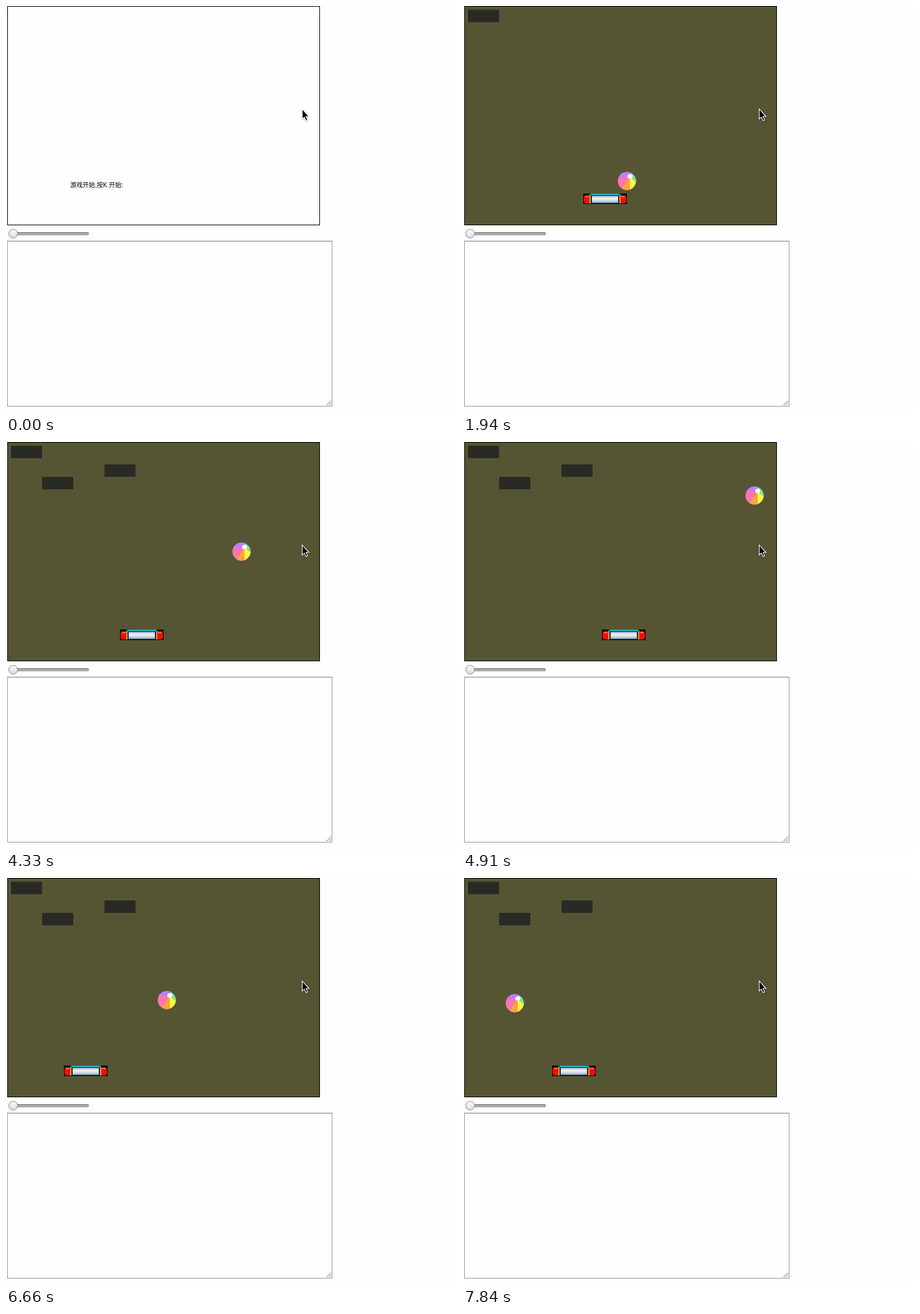
Recreate the animation shown at these times as an HTML page. Size 724 by 655 pixels, loop 7.99 s.

```html
<!DOCTYPE html>
<html lang="zh">
<head>
<meta charset="utf-8">
<title>打砖块</title>
<style>
  html, body { margin: 0; width: 100%; height: 100%; overflow: hidden; background: #fefefe; }
  svg { display: block; }
  text { font: 10px "Liberation Sans", "Noto Sans CJK SC", "Noto Sans CJK", sans-serif; }
  .crisp { shape-rendering: crispEdges; }
</style>
</head>
<body>
<svg width="724" height="655" viewBox="0 0 724 655">
  <defs>
    <linearGradient id="silver" x2="0" y2="1">
      <stop offset="0" stop-color="#a9bdd2"/>
      <stop offset=".35" stop-color="#eef3f9"/>
      <stop offset=".65" stop-color="#d3deea"/>
      <stop offset="1" stop-color="#8fa4ba"/>
    </linearGradient>
    <linearGradient id="track" x2="0" y2="1">
      <stop offset="0" stop-color="#858585"/>
      <stop offset="1" stop-color="#cfcfcf"/>
    </linearGradient>
    <linearGradient id="knob" x2="0" y2="1">
      <stop offset="0" stop-color="#fbfbfb"/>
      <stop offset="1" stop-color="#dcdcdc"/>
    </linearGradient>
    <clipPath id="round"><circle cx="15" cy="15" r="14.5"/></clipPath>
    <g id="cap">
      <path d="M3 3H10V16H3L1 13V6Z" fill="#f01000"/>
      <path d="M3 4H9V6H3Z" fill="#ff6a4a"/>
      <path d="M10 3H12V16H10Z" fill="#e89a3c"/>
    </g>
  </defs>

  <rect x="2.5" y=".5" width="501" height="351" fill="#fefefe" stroke="#000"/>
  <text id="title" x="103" y="291">游戏开始,按K 开始:</text>

  <g id="game">
    <rect class="crisp" x="3" y="1" width="500" height="350" fill="#555533"/>
    <g id="bricks" fill="#2a2a25"></g>
    <g id="paddle">
      <rect width="70" height="17" fill="#0b0b0b"/>
      <path d="M12 0H58L61 3H9Z" fill="#118ba5"/>
      <path d="M13 1H57V2H13Z" fill="#45bfd0"/>
      <use href="#cap"/>
      <use href="#cap" transform="matrix(-1 0 0 1 70 0)"/>
      <rect x="12" y="3" width="46" height="13" fill="#12303c"/>
      <rect x="14" y="4" width="42" height="11" fill="url(#silver)"/>
    </g>
    <g id="ball">
      <g clip-path="url(#round)">
        <rect width="30" height="30" fill="#ff74ae"/>
        <path d="M20 8L0 9V0H24Z" fill="#bd7dfb"/>
        <path d="M20 8L5 30H22Z" fill="#ffa43c"/>
        <path d="M20 8L20 30H30V14Z" fill="#fff740"/>
        <path d="M20 8L30 22V6Z" fill="#f4ff55"/>
        <path d="M20 8L30 18V0H21Z" fill="#72e59b"/>
      </g>
      <ellipse cx="20" cy="7.5" rx="4" ry="3.5" fill="#fff"/>
    </g>
  </g>

  <rect x="10.5" y="363.5" width="122" height="4" rx="1.5" fill="url(#track)" stroke="#8b8b8b"/>
  <circle cx="11.5" cy="365.5" r="7" fill="url(#knob)" stroke="#858585"/>

  <g fill="none" class="crisp">
    <rect x="2.5" y="377.5" width="521" height="265" stroke="#9a9a9a"/>
    <path d="M2 377.5H524" stroke="#7d7d7d"/>
  </g>
  <path d="M514.5 641L522 633.5M518.5 641L522 637.5" stroke="#666" fill="none"/>

  <path d="M475.5 165.5V181.5L479 178.3L481.6 184L484.2 182.9L481.7 177.3H486.4Z"
        fill="#000" stroke="#fff" stroke-width="1.1"
        style="filter: drop-shadow(0 1px 1px rgba(0,0,0,.35))"/>
</svg>

<script>
const LOOP = 7990, GAME_START = 440, LAUNCH = 3590;
const $ = id => document.getElementById(id);

const full = [[8, 6], [158, 36], [58, 56]];
const levels = [
  [0, full],
  [1940, [[8, 6]]],
  [2390, [[58, 36], [158, 61]]],
  [2690, full]
];

// Before the launch: [time, paddle x]
const warmup = [[0, 233], [1340, 213], [1490, 193]];

// After the launch the screen refreshes every 150 ms, sometimes 140 ms
const quick = new Set([2, 5, 8, 10, 13, 16, 18, 20, 24, 27]);
// Refreshes that cover five game ticks instead of four
const long = new Set([1, 3, 5, 7, 10, 17, 21, 24, 27]);
const paddleX = [193, 193, 193, 183, 183, 183, 193, 193, 203, 223,
                 223, 223, 213, 213, 203, 173, 143, 123, 103, 93,
                 93, 93, 93, 93, 103, 113, 123, 133, 143, 143];

const steps = [];
for (let i = 0, time = LAUNCH, tick = 0; i < paddleX.length; i++) {
  steps.push([time, { tick, paddle: paddleX[i] }]);
  time += quick.has(i) ? 140 : 150;
  tick += long.has(i) ? 5 : 4;
}

const at = (table, t) => table.findLast(row => row[0] <= t)[1];
const place = (id, x, y) => $(id).setAttribute('transform', `translate(${x} ${y})`);

// Bounces: right wall at tick 44, ceiling at 54, paddle at 108
function ballAt(tick) {
  const x = 473 - 5 * Math.abs(tick - 44);
  const y = tick < 108 ? 1 + 5 * Math.abs(tick - 54) : 271 - 5 * (tick - 108);
  return [x, y];
}

let shown;
function showLevel(level) {
  if (level === shown) return;
  shown = level;
  $('bricks').innerHTML = level.map(([x, y]) =>
    `<rect x="${x}" y="${y}" width="50" height="20" rx="1"/>`).join('');
}

function draw(t) {
  const playing = t >= GAME_START;
  $('title').style.display = playing ? 'none' : '';
  $('game').style.display = playing ? '' : 'none';
  showLevel(at(levels, t));
  if (t < LAUNCH) {
    place('paddle', at(warmup, t), 301);
    place('ball', 248, 266);
  } else {
    const { tick, paddle } = at(steps, t);
    place('paddle', paddle, 301);
    place('ball', ...ballAt(tick));
  }
}

const start = performance.now();
function frame() {
  draw((performance.now() - start) % LOOP);
  requestAnimationFrame(frame);
}
frame();
</script>
</body>
</html>
```
